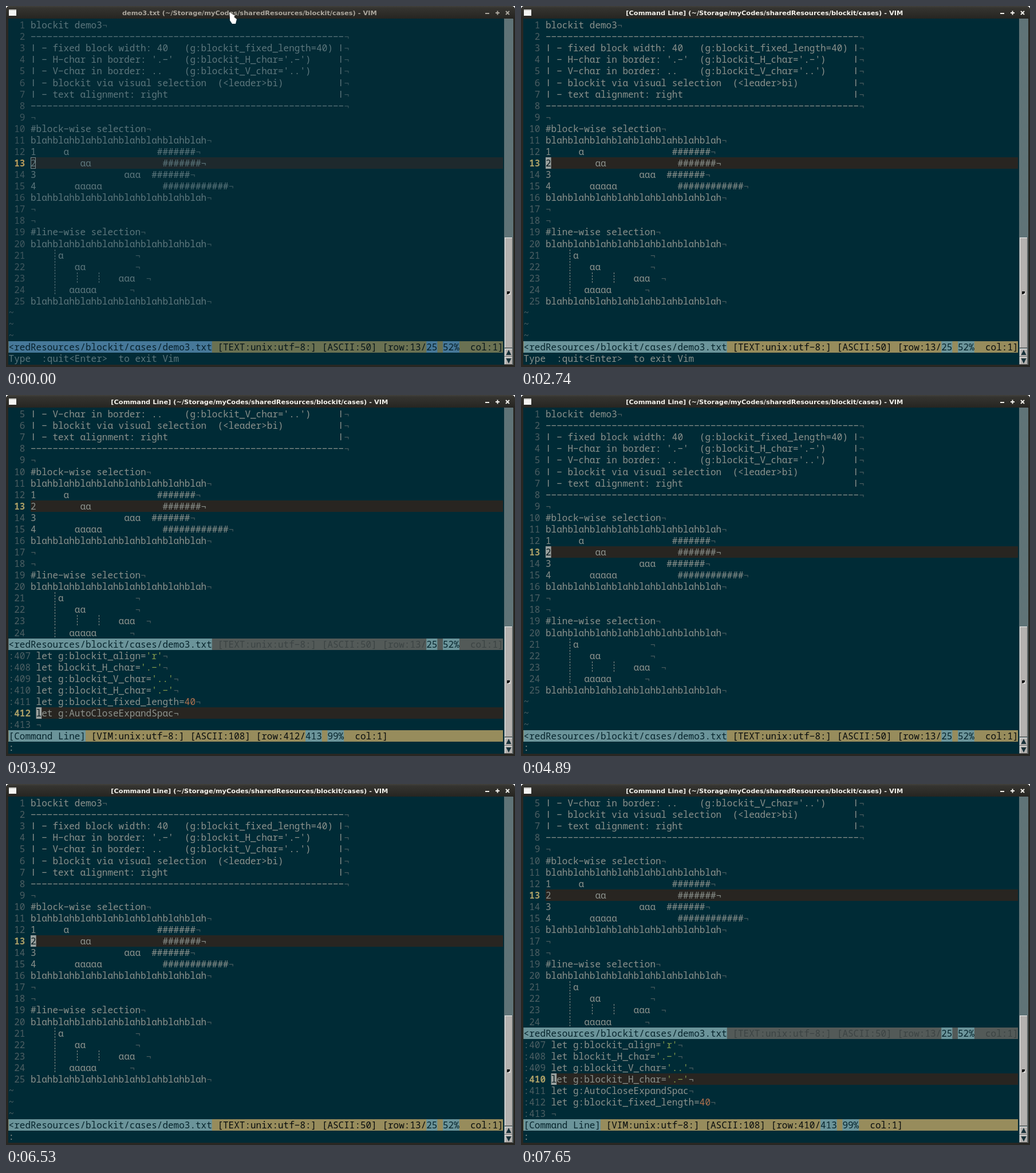
Recreate the animation shown at these times as an HTML page with a canvas. Size 889 px wide and 630 px high, loop 8 s.

```html
<!DOCTYPE html>
<html lang="en">
<head>
<meta charset="utf-8">
<title>blockit demo</title>
<style>
html, body { margin: 0; width: 100%; height: 100%; overflow: hidden; background: #fff; }
canvas { display: block; }
</style>
</head>
<body>
<canvas id="stage" width="889" height="630"></canvas>
<script>
const ctx = document.getElementById('stage').getContext('2d');
const LOOP = 8000, CELL = 9.6, PITCH = 20.07, LEFT = 4.6;
const MONO = '16px "Noto Sans Mono", monospace';
const BOLD = 'bold ' + MONO;
const TITLE = 'bold 11.37px "DejaVu Sans", sans-serif';
const PATH = '(~/Storage/myCodes/sharedResources/blockit/cases) - VIM';

// Each entry: unfocused colour, focused colour
const PALETTE = {
  bg: ['#022b36', '#002b36'],
  text: ['#5c767c', '#8b918c'],
  faint: ['#3c575e', '#4c5d60'],
  number: ['#40575e', '#4d5f63'],
  current: ['#b89c5c', '#ab9f67'],
  line: ['#1e292d', '#282521'],
  lineEol: ['#5c767c', '#8b918c'],
  bar: ['#6a7152', '#978c5c'],
  barText: ['#06151a', '#080c0d'],
  tag: ['#467899', '#6b949a'],
  tagText: ['#06202b', '#06242c'],
  idle: ['#505a58', '#535a58'],
  idleText: ['#3b4646', '#3c4444'],
  title: ['#aaa69d', '#f4f2ec'],
  cursor: ['#7b8a8c', '#99a09e'],
  string: ['#7f9a4a', '#839b4c'],
  digits: ['#a86b4a', '#b2714e']
};

const blah = 'blah'.repeat(8);
const rule = '-'.repeat(57);
const boxed = s => ('| - ' + s).padEnd(56) + '|';
const place = (...parts) => parts.reduce((s, [col, word]) => s.padEnd(col) + word, '');
const hashes = n => '#'.repeat(n);
const BUFFER = [
  'blockit demo3', rule,
  boxed('fixed block width: 40   (g:blockit_fixed_length=40)'),
  boxed("H-char in border: '.-'  (g:blockit_H_char='.-')"),
  boxed("V-char in border: ..    (g:blockit_V_char='..')"),
  boxed('blockit via visual selection  (<leader>bi)'),
  boxed('text alignment: right'),
  rule, '', '#block-wise selection', blah,
  place([0, '1'], [6, 'a'], [23, hashes(7)]),
  place([0, '2'], [9, 'aa'], [24, hashes(7)]),
  place([0, '3'], [17, 'aaa'], [22, hashes(7)]),
  place([0, '4'], [8, 'aaaaa'], [24, hashes(12)]),
  blah, '', '', '#line-wise selection', blah,
  place([5, 'a'], [19, '']),
  place([8, 'aa'], [19, '']),
  place([16, 'aaa'], [21, '']),
  place([7, 'aaaaa'], [18, '']),
  blah
];
const GUIDES = { 21: [4], 22: [4], 23: [4, 8, 12], 24: [4] };

const SETTINGS = ["let g:blockit_align='r'", "let blockit_H_char='.-'",
  "let g:blockit_V_char='..'", "let g:blockit_H_char='.-'"];
const WIDTH = 'let g:blockit_fixed_length=40', SPACING = 'let g:AutoCloseExpandSpac';
const FIRST = [...SETTINGS, WIDTH, SPACING, ''];
const SECOND = [...SETTINGS, SPACING, WIDTH, ''];

// [start, title is the command line, history shown, history row]
const STEPS = [
  [0, false], [2740, true],
  [2790, true, FIRST, 413], [3920, true, FIRST, 412], [4130, true, FIRST, 411],
  [4890, true], [4940, false], [6530, true],
  [6580, true, SECOND, 413], [7220, true, SECOND, 412],
  [7450, true, SECOND, 411], [7650, true, SECOND, 410]
];

let focus = 1, color = {};
const channel = (hex, i) => parseInt(hex.substr(1 + 2 * i, 2), 16);
const mix = ([a, b], k) => `rgb(${[0, 1, 2].map(i =>
  Math.round(channel(a, i) + (channel(b, i) - channel(a, i)) * k))})`;

const colX = c => LEFT + c * CELL;
const rowTop = r => Math.round(23.2 + (r - 1) * PITCH);

function rect(x, y, w, h, fill) {
  ctx.fillStyle = fill;
  ctx.fillRect(x, y, w, h);
}
// The terminal face has a one-storey a, a raised hyphen and a short bar
const GLYPHS = { a: 'ɑ', '-': '−', '|': ' ' };
function put(s, col, row, fill, font = MONO) {
  const text = String(s);
  ctx.font = font;
  ctx.fillStyle = fill;
  ctx.fillText(text.replace(/[a|-]/g, c => GLYPHS[c]), colX(col), rowTop(row) + 16);
  for (const { index } of text.matchAll(/\|/g)) {
    rect(Math.round(colX(col + index + .5)) - 1, rowTop(row) + 4, 1.4, 12, fill);
  }
}
function block(col, row, n, fill) {
  rect(colX(col), rowTop(row), n * CELL, 20, fill);
}
function shape(points, fill) {
  ctx.beginPath();
  points.forEach(([x, y]) => ctx.lineTo(x, y));
  ctx.closePath();
  ctx.fillStyle = fill;
  ctx.fill();
}

function highlight(col, row) {
  rect(colX(col), rowTop(row), 868 - colX(col), 20, color.line);
}
function cursor(char, col, row) {
  if (focus === 1) {
    block(col, row, 1, color.cursor);
    put(char, col, row, '#0a1c21');
  } else {
    ctx.strokeStyle = color.cursor;
    ctx.lineWidth = 1;
    ctx.strokeRect(43.5, rowTop(row) + .5, 8, 19);
  }
}

function drawBuffer(first, last, active) {
  for (let n = first; n <= last; n++) {
    const row = n - first + 1, s = BUFFER[n - 1], here = n === 13;
    if (here) highlight(4, row);
    put(String(n).padStart(3), 0, row, here ? color.current : color.number, here ? BOLD : MONO);
    put(s, 4, row, color.text);
    put('¬', 4 + s.length, row, here ? color.lineEol : color.faint);
    for (const col of GUIDES[n] || []) {
      const x = Math.round(colX(col + 4.5)) - 1;
      for (let y = 0; y < 20; y += 5) rect(x, rowTop(row) + y, 1, 3, color.text);
    }
    if (here && active) cursor('2', 4, row);
  }
}

function drawStatus(row, name, info, total, percent, tail, active = true) {
  rect(4, rowTop(row), 864, 20, active ? color.bar : color.idle);
  let col = 0;
  [name, info, total, ' ', percent, tail].forEach((s, i) => {
    const tag = i % 2 === 0 && i < 5;
    if (tag) block(col, row, s.length, color.tag);
    put(s, col, row, tag ? color.tagText : active ? color.barText : color.idleText);
    col += s.length;
  });
}
function fileStatus(row, active) {
  drawStatus(row, '<redResources/blockit/cases/demo3.txt',
    ' [TEXT:unix:utf-8:] [ASCII:50] [row:13/', '25', '52%', '  col:1]', active);
}

function drawHistory(list, current) {
  list.forEach((s, i) => {
    const n = 407 + i, row = 22 + i, here = n === current;
    if (here) highlight(5, row);
    put(':', 0, row, color.number);
    put(n, 1, row, here ? color.current : color.number, here ? BOLD : MONO);
    const [name, value] = s.split('=');
    put(value ? name + '=' : name, 5, row, color.text);
    if (value) put(value, 6 + name.length, row, value[0] === "'" ? color.string : color.digits);
    put('¬', 5 + s.length, row, here ? color.lineEol : color.faint);
    if (here) cursor(s[0] || '¬', 5, row);
  });
  const empty = current === 413;
  drawStatus(29, '[Command Line]',
    ` [VIM:unix:utf-8:] [ASCII:${empty ? 0 : 108}] [row:${current}/`,
    '413', empty ? '100%' : '99%', `  col:${empty ? 0 : 1}]`);
}

function drawFrame(title) {
  ctx.beginPath();
  ctx.roundRect(0, 0, 889, 630, [6, 6, 0, 0]);
  ctx.fillStyle = '#282723';
  ctx.fill();
  const shade = ctx.createLinearGradient(0, 0, 0, 22);
  shade.addColorStop(0, '#42413c');
  shade.addColorStop(.15, '#353430');
  shade.addColorStop(1, '#262521');
  ctx.beginPath();
  ctx.roundRect(0, 0, 889, 22, [6, 6, 0, 0]);
  ctx.fillStyle = shade;
  ctx.fill();
  rect(4, 22, 882, 604, color.bg);
  rect(5, 6, 13, 11, '#f4f4f2');
  rect(5, 6, 13, 2, '#c9c9c6');
  ctx.font = TITLE;
  ctx.fillStyle = color.title;
  ctx.textAlign = 'center';
  ctx.fillText(title, 425.3, 16);
  ctx.textAlign = 'left';
  rect(837, 12, 7, 2, color.title);
  rect(855, 11, 7, 2, color.title);
  rect(857.5, 8.5, 2, 7, color.title);
  ctx.strokeStyle = color.title;
  ctx.lineWidth = 2;
  ctx.beginPath();
  for (const d of [-3, 3]) {
    ctx.moveTo(876 - d, 9);
    ctx.lineTo(876 + d, 15);
  }
  ctx.stroke();
}

const tile = document.createElement('canvas');
tile.width = tile.height = 2;
const dots = tile.getContext('2d');
dots.fillStyle = '#2c454b';
dots.fillRect(0, 0, 2, 2);
dots.fillStyle = '#93a1a3';
dots.fillRect(0, 0, 1, 1);
dots.fillRect(1, 1, 1, 1);
const stipple = ctx.createPattern(tile, 'repeat');

function raised(y, h) {
  rect(871, y, 14, h, '#b4b1af');
  rect(871, y, 14, 1, '#f2f1f0');
  rect(871, y, 1, h, '#f2f1f0');
  rect(884, y, 1, h, '#5c5b59');
  rect(871, y + h - 1, 14, 1, '#5c5b59');
}
function drawScrollbar() {
  rect(870, 22, 16, 604, stipple);
  raised(404, 193);
  raised(598, 14);
  raised(612, 14);
  shape([[878, 600], [882.5, 609], [873.5, 609]], '#173038');
  shape([[873.5, 615], [882.5, 615], [878, 624]], '#173038');
  rect(876, 499, 5, 5, '#e4e2e0');
  shape([[875, 498], [880, 498], [880, 501], [877, 503], [875, 503]], '#111');
}

function drawPointer() {
  shape([[390, 11], [400, 17], [398, 19], [403, 23], [401, 31],
    [395, 31], [391, 25], [391, 20]], '#fff');
}

function draw(t) {
  focus = t < 370 ? 0 : Math.min(1, (Math.floor((t - 370) / 60) + 1) / 6);
  for (const key in PALETTE) color[key] = mix(PALETTE[key], focus);
  const [, command, list, current] = STEPS.findLast(step => step[0] <= t);

  ctx.clearRect(0, 0, 889, 630);
  drawFrame((command ? '[Command Line] ' : 'demo3.txt ') + PATH);
  if (list) {
    drawBuffer(5, 24, false);
    fileStatus(21, false);
    drawHistory(list, current);
  } else {
    drawBuffer(1, 25, true);
    for (let row = 26; row < 29; row++) put('~', 0, row, color.number);
    fileStatus(29, true);
  }
  put(t < 2790 ? 'Type  :quit<Enter>  to exit Vim' : ':', 0, 30, color.text);
  drawScrollbar();
  if (t < 370) drawPointer();
}

const start = performance.now();
function tick() {
  draw((performance.now() - start) % LOOP);
  requestAnimationFrame(tick);
}
tick();
</script>
</body>
</html>
```
